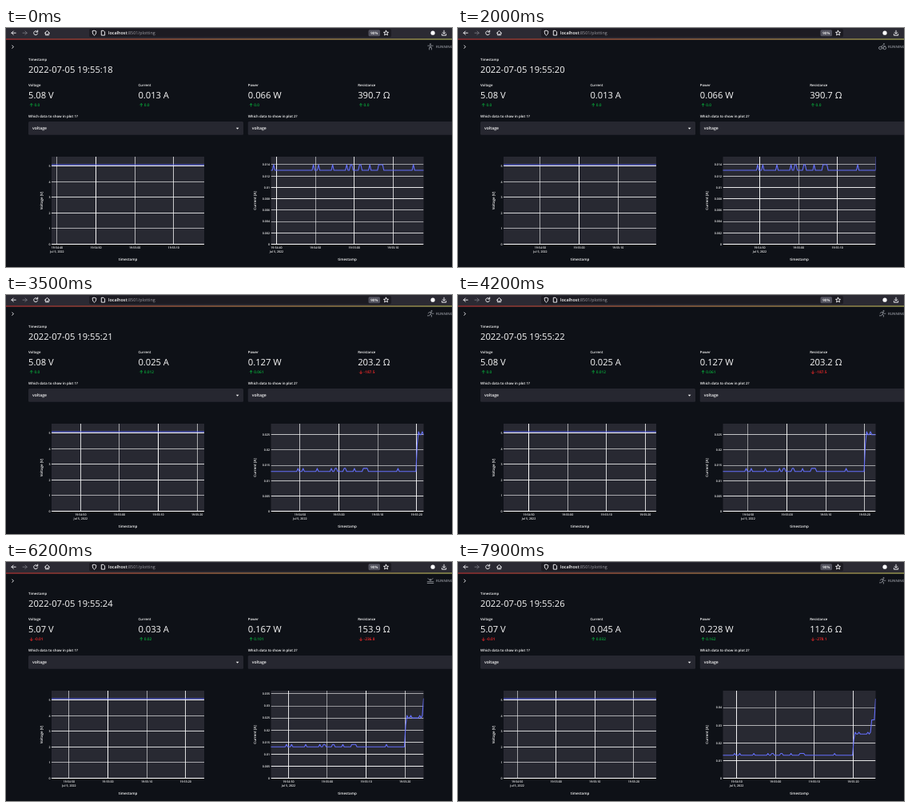
Write an HTML page that moves like this. It is 558x299 px and loops after 8 s.

```html
<!DOCTYPE html>
<html lang="en">
<head>
<meta charset="utf-8">
<title>Live plotting dashboard</title>
<style>
  html, body { margin: 0; width: 100%; height: 100%; overflow: hidden; background: #0e1117; }
  svg { display: block; }
  text { font-family: "Open Sans", "Noto Sans", sans-serif; font-weight: 600; fill: #fafafa; text-rendering: geometricPrecision; }
  .value { font-weight: 500; }
  .line { fill: none; stroke: #fbfbfe; stroke-width: .9; stroke-linecap: round; stroke-linejoin: round; }
  .grid { stroke: #fff; }
  .data { fill: none; stroke: #636efa; stroke-width: 1.1; stroke-linejoin: round; }
  .icon { fill: none; stroke: #92959c; stroke-width: .85; stroke-linecap: round; stroke-linejoin: round; }
</style>
</head>
<body>
<svg width="558" height="299" viewBox="0 0 558 299">
  <defs>
    <linearGradient id="stripe">
      <stop offset="0" stop-color="#ff4b4b"/>
      <stop offset="1" stop-color="#fffd80"/>
    </linearGradient>
  </defs>
  <rect width="558" height="299" fill="#0e1117"/>
  <rect width="558" height="13" fill="#2b2a33"/>
  <rect x="104" y="1" width="378" height="10.5" rx="2" fill="#1c1b22"/>
  <rect y="13.5" width="558" height="1" fill="url(#stripe)" opacity=".85"/>
  <g class="line">
    <path d="M12.2 6.2H7M9.2 4L7 6.2l2.2 2.2"/>
    <path d="M21 6.2h5.2M24 4l2.2 2.2L24 8.4" stroke="#77767e"/>
    <path d="M39.2 4.7A2.5 2.5 0 1 0 39.6 7M39.7 3v2h-2"/>
    <path d="M48.5 6.3l3-2.8 3 2.8M49.4 6v2.8h4.2V6M51.5 8.6V7.2"/>
    <path d="M110.5 3.3l2.3.8c0 2.7-.7 4.2-2.3 5.2-1.6-1-2.3-2.5-2.3-5.2z"/>
    <path d="M119.7 3.3h2.3l1.6 1.6v4.2h-3.9z"/>
    <path d="M475.5 3.2l.9 2 2.1.2-1.6 1.4.5 2.2-1.9-1.2-1.9 1.2.5-2.2-1.6-1.4 2.1-.2z"/>
    <path d="M548 3.2v3.9M546.3 5.6l1.7 1.7 1.7-1.7M545.4 7.6v1.6h5.2V7.6"/>
    <path d="M7.8 21.9l1.6 1.7-1.6 1.7"/>
  </g>
  <circle cx="534" cy="6.2" r="2.6" fill="#fbfbfe"/>
  <text x="128" y="8.3" font-size="5.4">localhost<tspan fill="#a09fa6" font-weight="400">:8501/plotting</tspan></text>
  <rect x="453.5" y="2.2" width="14.5" height="8" rx="1.5" fill="#52525e"/>
  <text x="460.8" y="8" font-size="4.5" text-anchor="middle">90%</text>
  <text x="538" y="25" font-size="4.4" style="fill:#92959c">RUNNING...</text>
  <text x="28" y="41.4" font-size="4.3">Timestamp</text>
  <g id="selects"></g>
  <g id="live"></g>
</svg>
<script>
const LOOP = 8000, CADENCE = 985, PLOT_DELAY = 200;
const PX_PER_SEC = 4.86, PLOT_W = 191, TOP = 161, ZERO_Y = 270.5, PLOT_H = ZERO_Y - TOP;

// Sensor model; times are seconds after 19:55:00.
const FIRST_READING = 17.87, READING_GAP = .99, READINGS = 9, SAMPLE_GAP = READING_GAP / 3;
const loadSteps = [[-99, .013], [20, .022], [20.4, .025], [24.7, .033], [25.6, .045]];
const bumps = [-20.8, -10.4, -9.2, -5.5, -2, -.8, 1.5, 4.1, 6.5, 6.9, 7.3, 15.3, 20.5, 21.4, 23.75, 24.4];

const readingTime = index => FIRST_READING + index * READING_GAP;
const truncate = (value, digits) => Math.floor(value * 10 ** digits + 1e-6) / 10 ** digits;
const ampsAt = t => loadSteps.findLast(step => step[0] <= t)[1] +
  (bumps.some(b => Math.abs(t - b) < .2) ? .001 : 0);
const voltsAt = t => 5.08 - .7 * Math.max(0, ampsAt(t) - .032);

const times = Array.from({ length: 150 }, (_, i) => readingTime(READINGS - 1) - i * SAMPLE_GAP);
const sample = signal => times.map(t => [t, signal(t)]);
const current = sample(ampsAt), voltage = sample(voltsAt);

const metrics = [
  ["Voltage", "V", 2, voltsAt],
  ["Current", "A", 3, ampsAt],
  ["Power", "W", 3, t => voltsAt(t) * ampsAt(t)],
  ["Resistance", "Ω", 1, t => voltsAt(t) / ampsAt(t)]
];

const byId = id => document.getElementById(id);
const text = (x, y, size, value, extra = "") =>
  `<text x="${x}" y="${y}" font-size="${size}" ${extra}>${value}</text>`;
const centred = 'text-anchor="middle"';

function metric([label, unit, digits, signal], column, now) {
  const x = 28 + 137.4 * column;
  const value = truncate(signal(now), digits);
  const change = +(value - truncate(signal(FIRST_READING), digits)).toFixed(digits);
  const color = change < 0 ? "#ff2b2b" : "#09ab3b";
  const head = change < 0 ? "M2 96.7l1.8 1.8 1.8-1.8" : "M2 96.3l1.8-1.8 1.8 1.8";
  return text(x, 73, 4.3, label) +
    text(x, 88, 11.2, `${value.toFixed(digits)} ${unit}`, 'class="value"') +
    `<path transform="translate(${x})" d="M3.8 94.6v3.8${head}" fill="none" stroke="${color}" stroke-width=".8"/>` +
    text(x + 7.4, 98.4, 4.8, change || "0.0", `style="fill:${color}"`);
}

// Lines sit on whole pixels and fade as their true position leaves the pixel centre.
function gridLine(position, toPath) {
  const snapped = Math.floor(position) + .5;
  return `<path class="grid" d="${toPath(snapped)}" stroke-opacity="${1 - Math.abs(position - snapped)}"/>`;
}

function plot(left, series, now, title, titleX) {
  const toX = t => left + PLOT_W - (now - t) * PX_PER_SEC;
  const max = 1.1 * Math.max(...series.filter(p => p[0] <= now + .01).map(p => p[1]));
  const toY = v => ZERO_Y - PLOT_H * v / max;
  const step = [.002, .005, .01, 1].find(s => max / s < 8);
  let grid = "", labels = "";
  for (let i = 0; i * step < max; i++) {
    const y = toY(i * step);
    grid += gridLine(y, p => `M${left} ${p}h${PLOT_W}`);
    labels += text(left - 1.5, y + 1.4, 3.6, +(i * step).toFixed(3), 'text-anchor="end"');
  }
  const first = Math.ceil((now - PLOT_W / PX_PER_SEC) / 10) * 10;
  for (let t = first; t < now; t += 10) {
    const x = toX(t), clock = t < 0 ? `19:54:${60 + t}` : `19:55:${String(t).padStart(2, "0")}`;
    grid += gridLine(x, p => `M${p} ${TOP}V${ZERO_Y}`);
    labels += text(x, 275.8, 3.6, clock, centred);
    if (t === first) labels += text(x, 281.2, 3.6, "Jul 5, 2022", centred);
  }
  const points = series.map(([t, v]) => `${toX(t)},${toY(v)}`).join(" ");
  const box = `x="${left}" y="${TOP}" width="${PLOT_W}" height="${PLOT_H + .5}"`;
  return `<rect ${box} fill="#282932"/>
    <svg ${box} viewBox="${left} ${TOP} ${PLOT_W} ${PLOT_H + .5}">
      ${grid}<polyline class="data" points="${points}"/></svg>` +
    labels + text(left + PLOT_W / 2, 290.8, 4.5, "timestamp", centred) +
    text(0, 0, 4.4, title, `${centred} transform="translate(${titleX} 216) rotate(-90)"`);
}

const dot = (x, y, r) => `M${x - r} ${y}a${r} ${r} 0 1 0 ${2 * r} 0a${r} ${r} 0 1 0 ${-2 * r} 0`;
const poses = {
  stand: dot(531, 20.2, .6) + "M527.8 22.2h6.4M531 22.2v2.3M529.6 27v-2.6h2.8V27",
  bike: dot(528.3, 25, 1.8) + dot(533.8, 25, 1.8) + dot(533, 20, .5) +
    "M531.2 26v-1.6l-1.7-1.2 2.2-1.7 1.2 1.3h1.6",
  run: dot(532.6, 20, .6) + "M528.4 23l1-1.5 2.6.2-1.2 2.6 1.8 1-.3 1.9M530.6 24.5l-.8 1.3-2.4.1M532 22l1.2 1.3 1.7-.1",
  swim: dot(531, 22, .6) + "M528 20.5l3 3 3-3M527.2 24.6h7.6M527.2 26.5h7.6"
};
const poseTimes = [[0, "stand"], [1600, "bike"], [3500, "run"], [4800, "swim"], [6800, "run"]];

function render(t) {
  const seconds = 18 + Math.floor(t / CADENCE);
  const now = readingTime(Math.floor((t - PLOT_DELAY) / CADENCE) + 1);
  const pose = poseTimes.findLast(p => p[0] <= t)[1];
  return `<path class="icon" d="${poses[pose]}"/>` +
    text(28, 56.4, 11.2, `2022-07-05 19:55:${seconds}`, 'class="value"') +
    metrics.map((m, column) => metric(m, column, now)).join("") +
    plot(57, voltage, now, "Voltage [V]", 45.5) +
    plot(331.5, current, now, "Current [A]", 312.5);
}

byId("selects").innerHTML = [28, 302.7].map((x, i) =>
  text(x, 111.6, 4.4, `Which data to show in plot ${i + 1}?`) +
  `<rect x="${x}" y="117" width="269" height="16.7" rx="1.5" fill="#262730"/>` +
  text(x + 5, 127.4, 5.1, "voltage") +
  `<path d="M${x + 259.8} 124.8h3.6l-1.8 1.9z" fill="#fafafa"/>`).join("");

let shown = "";
function frame() {
  const markup = render(performance.now() % LOOP);
  if (markup !== shown) byId("live").innerHTML = shown = markup;
  requestAnimationFrame(frame);
}
frame();
</script>
</body>
</html>
```
